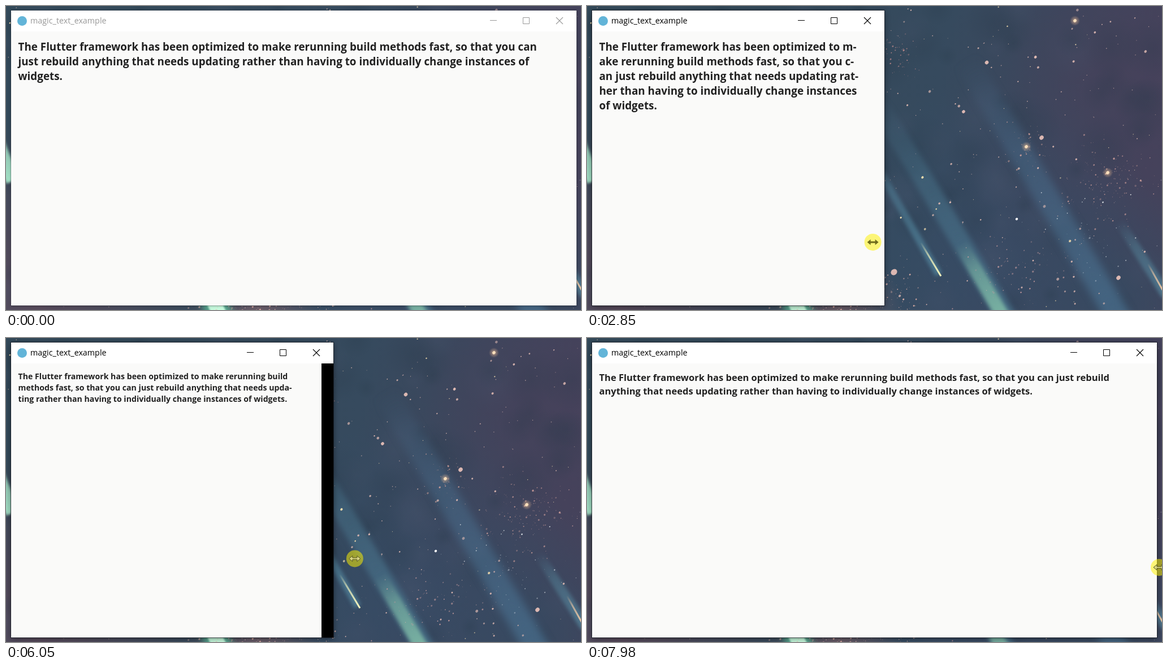
An HTML page with a canvas for the animation above (8000 ms loop, 1017 px wide and 538 px high).

```html
<!DOCTYPE html>
<html lang="en">
<head>
<meta charset="utf-8">
<title>magic_text_example</title>
<style>
html, body { margin: 0; width: 100%; height: 100%; overflow: hidden; background: #34475a; }
#stage { position: relative; width: 1017px; height: 538px; overflow: hidden; }
#sky { position: absolute; left: 0; top: 0; }
#win { position: absolute; left: 9px; top: 8px; height: 522px; background: #000;
  box-shadow: 0 0 0 1px rgba(30,35,45,.25), 0 1px 5px rgba(0,0,0,.25); color: #999; }
#win.active { box-shadow: 0 0 0 1px rgba(20,24,32,.7), 0 2px 10px rgba(0,0,0,.45); color: #000; }
#bar { position: absolute; left: 0; right: 0; top: 0; height: 37px; background: #fff; }
#icon { position: absolute; left: 11px; top: 9.5px; width: 17px; height: 17px; border-radius: 50%; background: #62b4d8; }
#name { position: absolute; left: 34px; right: 177px; top: 8px; font: 14.3px/20px "Open Sans", sans-serif;
  white-space: nowrap; overflow: hidden; text-overflow: ellipsis; }
#buttons { position: absolute; right: 0; top: 0; }
#page { position: absolute; left: 0; top: 37px; bottom: 0; background: #fafaf9; overflow: hidden; }
#text { position: absolute; left: 12.5px; top: 12.6px; color: #212121; white-space: pre;
  font-family: "Open Sans", sans-serif; font-weight: 700; }
#cursor { position: absolute; left: -16px; top: -16px; }
</style>
</head>
<body>
<div id="stage">
  <canvas id="sky" width="1017" height="538"></canvas>
  <div id="win">
    <div id="bar">
      <div id="icon"></div>
      <div id="name">magic_text_example</div>
      <svg id="buttons" width="178" height="37" fill="none" stroke="currentColor">
        <path d="M25 17.5h12M83.5 12.5h11v11h-11z"/>
        <path d="M142 12l12 12M154 12l-12 12" stroke-width="1.1"/>
      </svg>
    </div>
    <div id="page"><div id="text"></div></div>
  </div>
  <svg id="cursor" width="32" height="32" viewBox="-16 -16 32 32">
    <circle r="15" fill="#fff200" fill-opacity=".52"/>
    <path id="arrow" d="M-10 0L-4-5V-1.5H4V-5L10 0L4 5V1.5H-4V5Z"/>
  </svg>
</div>
<script>
const $ = id => document.getElementById(id);
const ctx = $('sky').getContext('2d');
const message = 'The Flutter framework has been optimized to make rerunning build methods fast, so that you can ' +
  'just rebuild anything that needs updating rather than having to individually change instances of widgets.';

// ---- wallpaper ----
let seed = 11;
function rnd() {
  seed = seed + 0x6D2B79F5 | 0;
  let v = Math.imul(seed ^ seed >>> 15, 1 | seed);
  v = v + Math.imul(v ^ v >>> 7, 61 | v) ^ v;
  return ((v ^ v >>> 14) >>> 0) / 4294967296;
}
const spread = () => rnd() + rnd() + rnd() - 1.5;

function glow(x, y, r, rgb, alpha) {
  const g = ctx.createRadialGradient(x, y, 0, x, y, r);
  g.addColorStop(0, `rgba(${rgb},${alpha})`);
  g.addColorStop(1, `rgba(${rgb},0)`);
  ctx.fillStyle = g;
  ctx.fillRect(x - r, y - r, 2 * r, 2 * r);
}

// A soft beam that fades in along its length.
function beam(x1, y1, x2, y2, width, rgb, alpha, blur) {
  const g = ctx.createLinearGradient(x1, y1, x2, y2);
  g.addColorStop(0, `rgba(${rgb},0)`);
  g.addColorStop(.35, `rgba(${rgb},${alpha * .6})`);
  g.addColorStop(1, `rgba(${rgb},${alpha})`);
  ctx.filter = `blur(${blur}px)`;
  ctx.strokeStyle = g;
  ctx.lineWidth = width;
  ctx.beginPath();
  ctx.moveTo(x1, y1);
  ctx.lineTo(x2, y2);
  ctx.stroke();
  ctx.filter = 'none';
}

function dot(x, y, r, color, alpha = 1) {
  ctx.globalAlpha = alpha;
  ctx.fillStyle = color;
  ctx.beginPath();
  ctx.ellipse(x, y, r, r * .85, 2.4, 0, 7);
  ctx.fill();
  ctx.globalAlpha = 1;
}

function dust(n, x, y, w, h, color) {
  for (let i = 0; i < n; i++)
    dot(x + spread() * w, y + spread() * h, .4 + rnd() ** 3 * 1.5, color, .3 + rnd() * .6);
}

function paintSky() {
  const base = ctx.createLinearGradient(250, 0, 1017, 150);
  base.addColorStop(0, '#334959');
  base.addColorStop(.5, '#364a5e');
  base.addColorStop(1, '#45425b');
  ctx.fillStyle = base;
  ctx.fillRect(0, 0, 1017, 538);
  glow(700, 470, 330, '52,78,106', .55);
  glow(930, 520, 230, '50,76,98', .7);
  glow(930, 120, 190, '72,64,90', .5);
  glow(60, 500, 300, '98,74,92', .85);
  glow(440, 545, 120, '132,98,106', .7);
  for (let i = 0; i < 150; i++)
    glow(rnd() * 1017, rnd() * 538, 15 + rnd() * 45, rnd() < .6 ? '38,56,72' : '72,84,108', .22);

  beam(670, 95, 945, 560, 42, '76,116,148', .65, 7);
  beam(510, 165, 750, 565, 34, '76,122,146', .7, 5);
  beam(660, 420, 742, 560, 24, '134,196,170', .85, 3);
  beam(485, 235, 622, 475, 13, '82,132,156', .75, 3);
  beam(940, 380, 1025, 512, 18, '84,130,152', .8, 3);
  beam(590, 418, 626, 478, 3, '250,248,190', 1, .4);
  beam(992, 456, 1020, 506, 3, '240,200,164', 1, .4);
  beam(235, 250, 385, 560, 44, '90,200,160', .75, 6);
  beam(255, 293, 385, 560, 25, '205,255,226', 1, 1.5);
  beam(-50, 150, 12, 310, 24, '170,235,205', .95, 2);

  dust(420, 440, 525, 140, 50, '#e6b4aa');
  dust(80, 545, 85, 45, 40, '#c08b8c');
  dust(150, 920, 310, 75, 80, '#d0a09c');
  dust(50, 780, 250, 40, 40, '#d3a19a');
  dust(90, 760, 470, 110, 60, '#cda0a2');
  dust(50, 890, 395, 110, 90, '#f2f6f8');
  for (let i = 0; i < 420; i++)
    dot(rnd() * 1017, rnd() * 538, .6 + rnd() ** 3 * 2.2, rnd() < .15 ? '#f2dcae' : '#deb9b2', .5 + rnd() * .5);
  for (const [x, y, r] of [[437, 226, 4], [804, 233, 4], [543, 471, 6], [666, 187, 3], [940, 481, 4], [707, 100, 3.5]])
    dot(x, y, r, '#dcb8b2');
  for (const [x, y] of [[863, 26], [777, 249], [921, 295]]) {
    glow(x, y, 9, '240,190,150', .7);
    dot(x, y, 3, '#f8dfbc');
  }
  dot(760, 377, 2.4, '#fff');
}

// ---- motion ----
const SHRINK = 1390, GROW = 4950;
const pointerX = [[150, 1040], [220, 1006], [520, 1022], [1240, 1020], [SHRINK, 1006], [1620, 938], [2150, 668],
  [2850, 506], [3690, 303], [GROW, 303], [5430, 445], [6660, 790], [7500, 1012]];
const pointerY = [[220, 494], [520, 436], [1620, 422], [2850, 418], [3690, 385], [5430, 385], [6660, 396], [7980, 406]];
// [from, font size, line height]
const fits = [[0, 18.83, 26.1], [3300, 23.3, 33.75], [4080, 14.16, 20], [6100, 29.5, 41.2], [7450, 16.5, 24]];

function at(keys, t) {
  const i = keys.findIndex(k => k[0] > t);
  if (i < 0) return keys[keys.length - 1][1];
  if (i === 0) return keys[0][1];
  const [t0, a] = keys[i - 1], [t1, b] = keys[i];
  return a + (b - a) * (t - t0) / (t1 - t0);
}

// The window edge trails the pointer and slowly catches up.
function edgeAt(t) {
  const since = t - (t < GROW ? SHRINK : GROW);
  const lag = Math.min(165, Math.max(0, 165 - .042 * since));
  return Math.min(1009, at(pointerX, t - lag) - 4);
}

// ---- text layout ----
function wrap(size, room, hyphens) {
  ctx.font = '700 100px "Open Sans", sans-serif';
  const fitsIn = s => ctx.measureText(s).width * size / 100 <= room;
  const lines = [];
  let line = '';
  for (let word of message.split(' ')) {
    for (;;) {
      const lead = line ? line + ' ' : '';
      if (fitsIn(lead + word)) { line = lead + word; break; }
      // keep at least two letters after a hyphen
      let n = hyphens ? Math.max(0, word.length - 2) : 0;
      while (n > 0 && !fitsIn(lead + word.slice(0, n) + '-')) n--;
      if (!n && !line) { line = word; break; }
      lines.push(n ? lead + word.slice(0, n) + '-' : line);
      word = word.slice(n);
      line = '';
    }
  }
  return lines.concat(line).join('\n');
}

const STEP = 1000 / 13;
let shown = -1;
function draw(now) {
  requestAnimationFrame(draw);
  const time = now % 8000, origin = time < 4500 ? SHRINK : 4889;
  const t = Math.max(0, origin + Math.floor((time - origin) / STEP + .1) * STEP);
  if (t === shown) return;
  shown = t;

  const growing = t > GROW, edge = Math.round(edgeAt(t));
  const pageEdge = growing ? Math.round(edgeAt(t - 75)) : edge;
  const textEdge = growing ? edgeAt(t - Math.max(0, 177 - .077 * (t - GROW))) : edge;
  const [, size, pitch] = fits.filter(f => f[0] <= t).pop();
  const hyphens = t > 1650 && t < 4080 || growing && t < 7450;

  $('win').className = t > 1200 ? 'active' : '';
  $('win').style.width = edge - 9 + 'px';
  $('page').style.width = pageEdge - 9 + 'px';
  Object.assign($('text').style, {
    fontSize: size + 'px', lineHeight: pitch + 'px', paddingTop: pitch * .035 + 'px'
  });
  $('text').textContent = wrap(size, (textEdge - 34) * .945, hyphens);

  const x = at(pointerX, t), y = at(pointerY, t), inside = x < edge;
  $('cursor').style.transform = `translate(${x}px, ${y}px)`;
  $('arrow').setAttribute('fill', inside ? '#6f6b1c' : '#d8d480');
  $('arrow').setAttribute('stroke', inside ? 'none' : '#55561f');
}

paintSky();
draw(performance.now());
</script>
</body>
</html>
```
